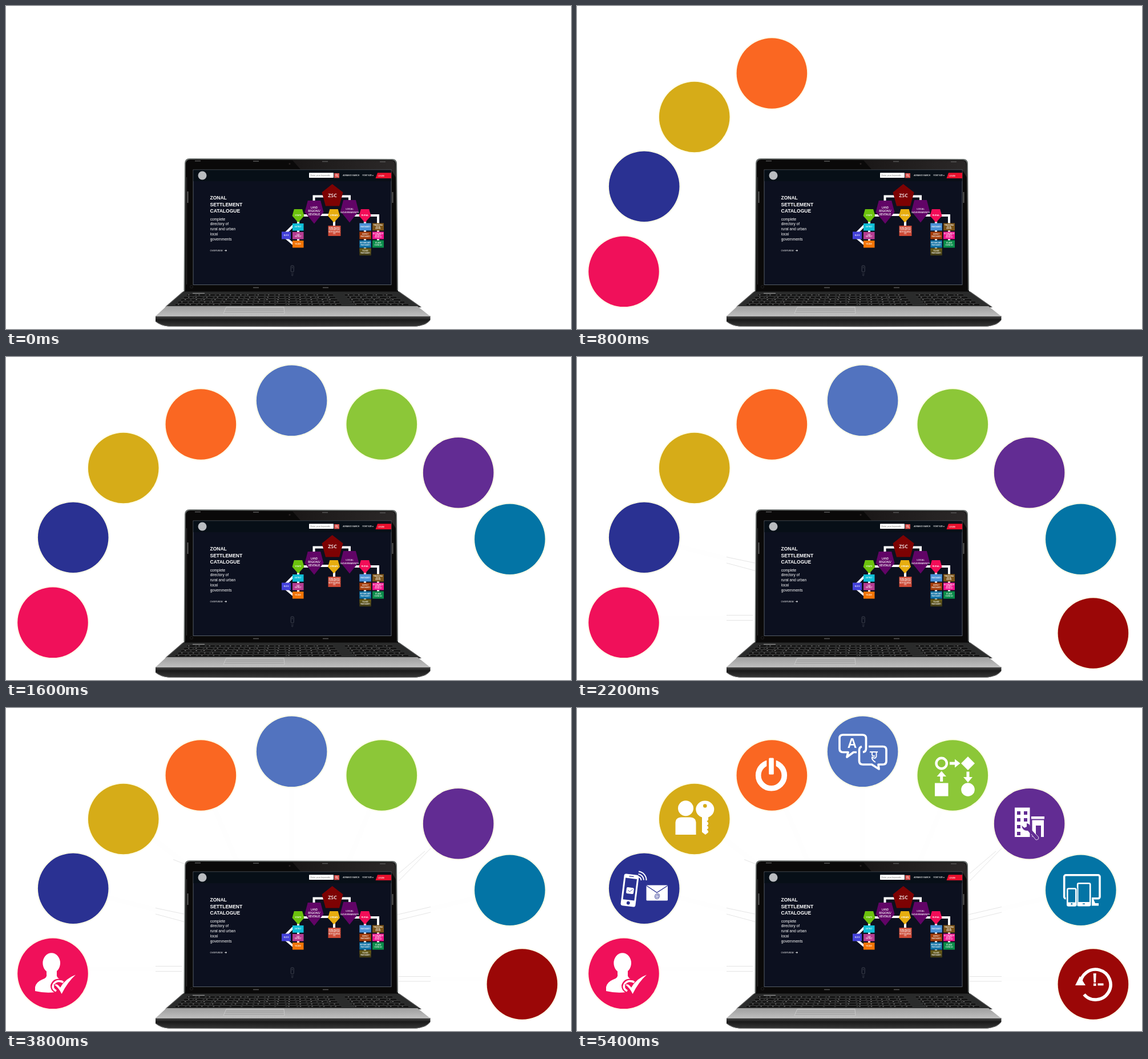
Write an HTML page that moves like this. It is 990 by 566 pixels and loops after 8 s.

```html
<!DOCTYPE html>
<html lang="en">
<head>
<meta charset="utf-8">
<title>Directory features</title>
<style>
html, body { margin: 0; width: 100%; height: 100%; overflow: hidden; background: #fff; }
svg { display: block; width: 100vw; height: 100vh; }
text { fill: #fff; font-family: "Liberation Sans", Arial, sans-serif; }
.ui { font-family: "Open Sans", sans-serif; font-weight: 600; }
.mid { text-anchor: middle; }
</style>
</head>
<body>
<svg id="stage" viewBox="0 0 990 566">
  <defs>
    <linearGradient id="palm" x1="0" y1="0" x2="0" y2="1">
      <stop offset="0" stop-color="#a0a0a0"/><stop offset=".45" stop-color="#adadad"/><stop offset="1" stop-color="#bebebe"/>
    </linearGradient>
    <linearGradient id="front" x1="0" y1="0" x2="0" y2="1">
      <stop offset="0" stop-color="#4c4c4c"/><stop offset=".35" stop-color="#1a1a1a"/><stop offset="1" stop-color="#393939"/>
    </linearGradient>
    <linearGradient id="glare" x1="0" y1="0" x2="1" y2="0">
      <stop offset="0" stop-color="#1a1717"/><stop offset="1" stop-color="#2b2828"/>
    </linearGradient>
    <linearGradient id="olive" x1="0" y1="0" x2="0" y2="1">
      <stop offset="0" stop-color="#6f6118"/><stop offset="1" stop-color="#3b3614"/>
    </linearGradient>
  </defs>

  <g id="links"></g>

  <g id="laptop">
    <!-- lid -->
    <path d="M311.500 501L313 276Q313 267 322 267L677 268Q684.500 268 685 276L687 501Z" fill="#666b69"/>
    <path d="M313.500 500L315 277Q315 269 323 269L676 270Q682.500 270 683 277L685 500Z" fill="#0a0909"/>
    <path d="M502 270.500L676 271Q681.500 271 682 278L683 300L675 287L516 286Z" fill="url(#glare)"/>
    <path d="M316.500 300V488" stroke="#333" stroke-width="1"/>
    <path d="M331 271.500h10M433 272h10M554 272.500h10M655 273h10M433 493.500h10M555 493.500h10" stroke="#555" stroke-width="1.600"/>
    <path d="M318.500 325v20M677.500 326v19" stroke="#606060" stroke-width="1.800"/>
    <circle cx="497" cy="276.500" r="1.500" fill="#2a2424"/>
    <circle cx="325" cy="492" r="2.500" fill="none" stroke="#2c2c2c" stroke-width=".7"/>
    <rect x="328" y="287" width="347" height="201.500" fill="#0c101f" stroke="#68707a" stroke-width=".8"/>
    <rect x="328.400" y="287.400" width="346.200" height="19.600" fill="#070f17"/>

    <!-- base -->
    <path d="M311 500H688L728 528H279Z" fill="#2a2b2b"/>
    <path d="M310 501L280 527M689 501L726 527" stroke="#5a5a5a" stroke-width="1.200"/>
    <path d="M313 499.500H687" stroke="#0a0a0a" stroke-width="2"/>
    <path d="M327 503.500h21" stroke="#8b8b8b" stroke-width="1.300"/>
    <g id="keys"></g>
    <path d="M281 526H721L743 543.500H262Z" fill="url(#palm)"/>
    <path d="M386 527.500H487L488 539H381Z" fill="#ababab" stroke="#d0d0d0" stroke-width=".8"/>
    <path d="M383 535.500H487" stroke="#c6c6c6" stroke-width=".6"/>
    <path d="M262 543H743.500V550Q738 559 720 561.500Q500 563 284 561.500Q270 560 262 553Z" fill="url(#front)"/>
    <path d="M262 543.200H743" stroke="#d0d0d0" stroke-width="1"/>
    <path d="M263 553Q272 560 286 561.300H718Q736 559 742 551" fill="none" stroke="#777" stroke-width=".8"/>
  </g>

  <g id="page">
    <circle cx="344" cy="297" r="7.500" fill="#b9bcc0"/>
    <rect x="531" y="292.300" width="43" height="8.700" rx=".8" fill="#fff"/>
    <text x="533.500" y="298" font-size="3.800" style="fill:#777">Enter your keywords</text>
    <rect x="575" y="293" width="9" height="8.300" fill="#d9534f"/>
    <path d="M580.500 297.800l1.600 1.700" stroke="#fff" stroke-width=".8"/>
    <circle cx="579.300" cy="296.500" r="1.500" fill="none" stroke="#fff" stroke-width=".7"/>
    <text class="ui" x="590.300" y="298.400" font-size="3.350">ADVANCE SEARCH</text>
    <text class="ui" x="624.500" y="298.400" font-size="3.350">FONT SIZE</text>
    <path d="M641.500 296.600h2.600l-1.300 1.500Z" fill="#fff"/>
    <path d="M651 292.200H675V302H647.500Z" fill="#e9102d"/>
    <text class="ui" x="652" y="298.500" font-size="3.400">LOGIN</text>
    <g font-size="8.500" font-weight="700">
      <text x="357.500" y="339.300">ZONAL</text>
      <text x="357.500" y="350.800">SETTLEMENT</text>
      <text x="357.500" y="362">CATALOGUE</text>
    </g>
    <g font-size="6.550">
      <text x="357.700" y="375.500">complete</text>
      <text x="357.700" y="384.400">directory of</text>
      <text x="357.700" y="393.300">rural and urban</text>
      <text x="357.700" y="402.200">local</text>
      <text x="357.700" y="411">governments</text>
    </g>
    <text x="357.500" y="430" font-size="4.150">OVERVIEW</text>
    <path d="M383 428.500h3.500m-1.600-1.600l1.700 1.600l-1.700 1.600" fill="none" stroke="#fff" stroke-width=".8"/>
    <g fill="none" stroke="#5a5e68" stroke-width=".7">
      <rect x="499.200" y="455" width="5" height="11" rx="1.500"/>
      <path d="M501.700 457v2.500M500 468.500l1.700 1.700l1.700-1.700M500 471l1.700 1.700l1.700-1.700"/>
    </g>
    <path d="M557 333.500H539.500V346M587 333.500H602V346M518 367H530M550 366H569M610 367H623M636 367H652V384M512 375V415M575 375V388M629 375V428M652 390V415M503 385L490 398M490 406L503 417" fill="none" stroke="#fff" stroke-width="4"/>
    <g id="chart"></g>
  </g>

  <g id="discs"></g>

  <g id="icons" fill="#fff">
    <g>
      <ellipse cx="79.700" cy="447" rx="15.300" ry="17.800"/>
      <path d="M71 458H89V466Q88 472 94 475L100 478Q90 478 84 483Q78 490 86 498Q68 500 51 496V489Q53 480 63 476Q73 473 71 466Z"/>
      <path d="M99 476Q83 474 79.500 486Q79 494 87 498" fill="none" stroke="#f0105a" stroke-width="3"/>
      <path d="M101 481Q90 475 84 483Q79 491 88 496" fill="none" stroke="#fff" stroke-width="3.500"/>
      <path d="M85 485Q90 482 95 490Q104 474 122 467.500Q108 480 97.500 501Q93 491 85 485Z" stroke="#f0105a" stroke-width="2" paint-order="stroke"/>
    </g>
    <g>
      <g transform="translate(92.500 319.500) rotate(7)">
        <rect x="-13" y="-28" width="26" height="56" rx="3.500"/>
        <rect x="-10" y="-21" width="20" height="38" fill="#2a3192"/>
        <path d="M-4-24.500h8" stroke="#2a3192" stroke-width="1.300"/>
        <circle cy="22.300" r="3" fill="#2a3192"/>
        <rect x="-6" y="-5" width="13" height="11" rx="2"/>
        <path d="M-3 0l3 2.500l5-5" fill="none" stroke="#2a3192" stroke-width=".8"/>
      </g>
      <path d="M107 295.500A7 7 0 0 1 112.500 302M107.500 291A11 11 0 0 1 117 301.500M108 286.500A15 15 0 0 1 121.500 302" fill="none" stroke="#fff" stroke-width="2"/>
      <rect x="121.500" y="310.500" width="37.500" height="27" rx="1.500"/>
      <path d="M122 311.500L140 323.500L158.500 311.500" fill="none" stroke="#2a3192" stroke-width="1.400"/>
      <text class="mid" x="140.500" y="332.500" font-size="10.500" font-weight="700" style="fill:#2a3192">@</text>
    </g>
    <g>
      <circle cx="190.500" cy="175.800" r="13.500"/>
      <path d="M172.500 222V202Q172.500 191.500 183 191.500H198Q208.500 191.500 208.500 202V222Z"/>
      <circle cx="224.300" cy="178" r="17.300" fill="#d6ac18"/>
      <ellipse cx="224.300" cy="177.500" rx="16" ry="15"/>
      <path d="M219 189H230V196L227.500 198.500L230 201V204L227.500 206L230 208V211L227.500 213L230 215.500V218L225 222L219 217.500Z"/>
      <circle cx="224.300" cy="171.500" r="3.300" fill="#d6ac18"/>
    </g>
    <g>
      <circle cx="340.500" cy="118" r="22.800" fill="none" stroke="#fff" stroke-width="9.600"/>
      <rect x="332.300" y="86" width="16.400" height="31" fill="#fa6722"/>
      <rect x="336.200" y="87.500" width="8.600" height="29" rx="1.500"/>
    </g>
    <g>
      <g fill="none" stroke="#fff" stroke-width="3.700" stroke-linejoin="round">
        <path d="M490 77.500H484.500L473 86L475 77.500H466Q460 77.500 460 71.500V53Q460 47 466 47H500Q506.500 47 506.500 53V71Q506.500 76.500 501 77.500"/>
        <path d="M511 67.500H536Q542 67.500 542 73.500V93Q542 99 536 99H528L529 107L516.500 99H501Q494.500 99 494.500 93V74Q494.500 69 499 67.500"/>
        <path d="M513 77H527M517 77V82Q518 85 522 84M524.500 77V85Q523 90 517 86Q516 91 523 95" stroke-width="1.900"/>
      </g>
      <text class="mid" x="482" y="70" font-size="23" font-weight="700">A</text>
    </g>
    <g>
      <circle cx="638.700" cy="97" r="9.200" fill="none" stroke="#fff" stroke-width="4.400"/>
      <path d="M653 94.500H662V89.500L671.500 97L662 104.500V99.500H653ZM685 85L697 97L685 109L673 97ZM682.500 111.500H687.500V121H693L685 130.500L677 121H682.500ZM636.200 129H641.200V120H647L638.700 110.500L630.500 120H636.200ZM627 131.500H650.500V154.500H627Z"/>
      <circle cx="685" cy="143" r="11.800"/>
    </g>
    <g>
      <path d="M767 174.500H793.500V226H767ZM796 190H819V194.500H796ZM797.500 196.500H818V226H797.500Z"/>
      <path d="M771 181h6v6h-6ZM783 181h6v6h-6ZM771 193h6v6h-6ZM783 193h6v6h-6ZM771 205h6v6h-6ZM771 217h6v6h-6ZM804 206h9v20h-9Z" fill="#622c93"/>
      <path d="M779 206L784 210L788 208L788 202Q795 203 794 211L808 226Q809 231 803 231L790 215Q781 216 779 206Z" fill="#622c93"/>
      <path d="M796 221L804 231Q810 231 808.500 226L803 220" fill="none" stroke="#fff" stroke-width=".8"/>
    </g>
    <g>
      <rect x="853.700" y="292.800" width="62.300" height="41" rx="3" fill="none" stroke="#fff" stroke-width="3.600"/>
      <path d="M896 335H905L908 342H914V346.500H896Z"/>
      <rect x="875" y="305" width="27" height="43" rx="3" fill="#0374a5"/>
      <rect x="877.200" y="307.200" width="22" height="39" rx="2" fill="none" stroke="#fff" stroke-width="2.600"/>
      <path d="M877 340H899V346H877Z"/>
      <path d="M886 343.200h4" stroke="#0374a5" stroke-width="1.500"/>
      <rect x="856.500" y="313.500" width="20" height="35" rx="3" fill="#0374a5"/>
      <rect x="859.300" y="316.500" width="15" height="30" rx="2" fill="none" stroke="#fff" stroke-width="2.600"/>
      <path d="M859 340.500H874V346.500H859Z"/>
      <circle cx="866.800" cy="343.300" r="1.400" fill="#0374a5"/>
    </g>
    <g>
      <path d="M882 485A26.500 26.500 0 1 1 888.500 502" fill="none" stroke="#fff" stroke-width="5.600"/>
      <path d="M873 486L881 470L891 486Z"/>
      <path d="M904.700 465H909.700L909 481H905.500ZM905 482.500h4.500v4.500h-4.500ZM912.500 482.500h10v3.700h-10Z"/>
    </g>
  </g>
</svg>
<script>
const $ = id => document.getElementById(id);
const add = (parent, tag, attrs, text) => {
  const el = document.createElementNS('http://www.w3.org/2000/svg', tag);
  for (const k in attrs) el.setAttribute(k, attrs[k]);
  if (text) el.textContent = text;
  parent.appendChild(el);
  return el;
};

// Keyboard: rows widen toward the front edge
for (let r = 0; r < 5; r++) {
  const y = 505 + r * 4.2, left = 317 - r * 5, right = 679 + r * 7;
  const n = 21, w = (right - left) / n;
  for (let c = 0; c < n; c++) {
    const x = left + c * w;
    if (c === 15) continue;
    add($('keys'), 'path', {
      d: `M${x} ${y}h${w - 2}l${(c - 10) * 0.12} 2.900h${2 - w}Z`,
      fill: '#0a0a0a', stroke: '#484848', 'stroke-width': 0.5
    });
    if (r < 4 || c < 4 || c > 9) {
      add($('keys'), 'rect', { x: x + 2 + (c * 7 + r * 5) % 6, y: y + 0.7, width: 2.5, height: 0.9, fill: '#999' });
    }
  }
}

// Hierarchy chart
const chart = $('chart');
const label = (cx, cy, size, lines) => lines.split('|').forEach((s, i, all) =>
  add(chart, 'text', {
    class: 'ui mid', x: cx, 'font-size': size,
    y: cy + size * 0.36 + (i - (all.length - 1) / 2) * size * 1.3
  }, s));
const shield = (cx, top, w, h, color, size, lines) => {
  const a = w * 0.34, side = top + h * 0.5;
  add(chart, 'path', {
    d: `M${cx - a} ${top}H${cx + a}L${cx + w / 2} ${side}L${cx} ${top + h}L${cx - w / 2} ${side}Z`, fill: color
  });
  label(cx, top + h * 0.46, size, lines);
};
const box = (x, y, w, h, color, size, lines) => {
  add(chart, 'rect', { x, y, width: w, height: h, fill: color });
  label(x + w / 2, y + h / 2, size, lines);
};
add(chart, 'path', { d: 'M571.700 312L590.500 326.500L584 350.500H560L553.500 326.500Z', fill: '#7d0203' });
label(572, 331.800, 8.8, 'ZSC');
shield(540, 341, 33, 40.5, '#610466', 4.5, 'LAND|REGIONS/|REVENUE');
shield(602, 340, 32, 39.5, '#610466', 4.3, 'LOCAL|GOVERNMENTS');
shield(512, 356, 21, 23.5, '#6cc20d', 4.1, 'STATE');
shield(574.500, 356, 21, 23.5, '#e7ad0f', 4.1, 'URBAN');
shield(629, 356, 21, 23.5, '#f20c57', 4.1, 'RURAL');
box(483, 395.5, 16, 13, '#4341d9', 2.7, 'BLOCK');
box(502, 381, 19.5, 12.7, '#0fbdd6', 2.7, 'DISTRICT');
box(502, 396, 19.5, 12.7, '#b63c91', 2.7, 'SUB|DISTRICT');
box(502, 411, 19.5, 12.5, '#f37405', 2.7, 'VILLAGE');
box(564.5, 385, 22, 18, '#cc4935', 2.5, 'MUNICIPALITIES,|CORPORATIONS,|NOTIFIED AREAS,|ETC');
box(619.3, 380.5, 20.5, 13, '#4a91d6', 2.7, 'PANCHAYATS');
box(619.3, 395.5, 20.5, 13, '#a33c0b', 2.7, 'DISTRICT|PANCHAYATS');
box(619.3, 410.5, 20.5, 13, '#1072a4', 2.7, 'INTERMEDIATE|PANCHAYATS');
box(619.3, 424.5, 20.5, 12.7, 'url(#olive)', 2.7, 'VILLAGE|PANCHAYATS');
box(642, 380.5, 20, 13, '#7b5317', 2.5, 'TRADITIONAL|LOCAL|BODIES');
box(642, 395.5, 20, 13, '#f0148e', 2.5, 'AUTONOMOUS|DISTRICT|COUNCILS');
box(642, 410.5, 20, 13, '#0a8c4a', 2.7, 'VILLAGE|COUNCILS');

// Discs: centre and colour, in order of appearance
[
  [82, 465.3, '#f0105a'], [117.7, 316.2, '#2a3192'], [205.7, 194.5, '#d6ac18'],
  [341.4, 118, '#fa6722'], [500.6, 76.3, '#5273bf'], [658.3, 118, '#8cc738'],
  [792.6, 202.7, '#622c93'], [882.8, 319.2, '#0374a5'], [904.4, 484, '#9b0707']
].forEach(([cx, cy, fill]) => {
  const g = add($('discs'), 'g', {});
  add(g, 'circle', { cx, cy, r: 64, fill: '#fefeea' });
  add(g, 'circle', { cx, cy, r: 61.8, fill });
});

// Pale connectors: wide band plus the thin edges near the laptop
[
  ['M144 457L316 457', 'M262 452.500H308M262 461.500H308'],
  ['M178 332L316 367', 'M262 350.500L312 361M262 361L312 374.500'],
  ['M258 229L330 285', 'M293 265.500L312 273'],
  ['M365 175L405 270', ''],
  ['M500 138V270', ''],
  ['M638 177L600 270', ''],
  ['M745 243L686 297', 'M688 290L734 251M688 303L744 246'],
  ['M822 333L684 367', 'M686 362L744 348.500M686 372L744 358'],
  ['M843 475H686', 'M688 470.500H744M688 479H744']
].forEach(([band, edges]) => {
  const g = add($('links'), 'g', { fill: 'none' });
  add(g, 'path', { d: band, stroke: '#fefefe', 'stroke-width': 8 });
  add(g, 'path', { d: edges, stroke: '#dedede', 'stroke-width': 0.8 });
});

const parts = ['discs', 'links', 'icons'].flatMap(id => [...$(id).children]);
const LOOP = 8000, STEP = 200;
const start = performance.now();

function draw(t) {
  const shown = Math.floor(t / STEP);
  parts.forEach((el, i) => { el.style.display = i < shown ? '' : 'none'; });
}
function tick(now) {
  draw(Math.max(0, now - start) % LOOP);
  requestAnimationFrame(tick);
}
draw(0);
requestAnimationFrame(tick);
</script>
</body>
</html>
```
